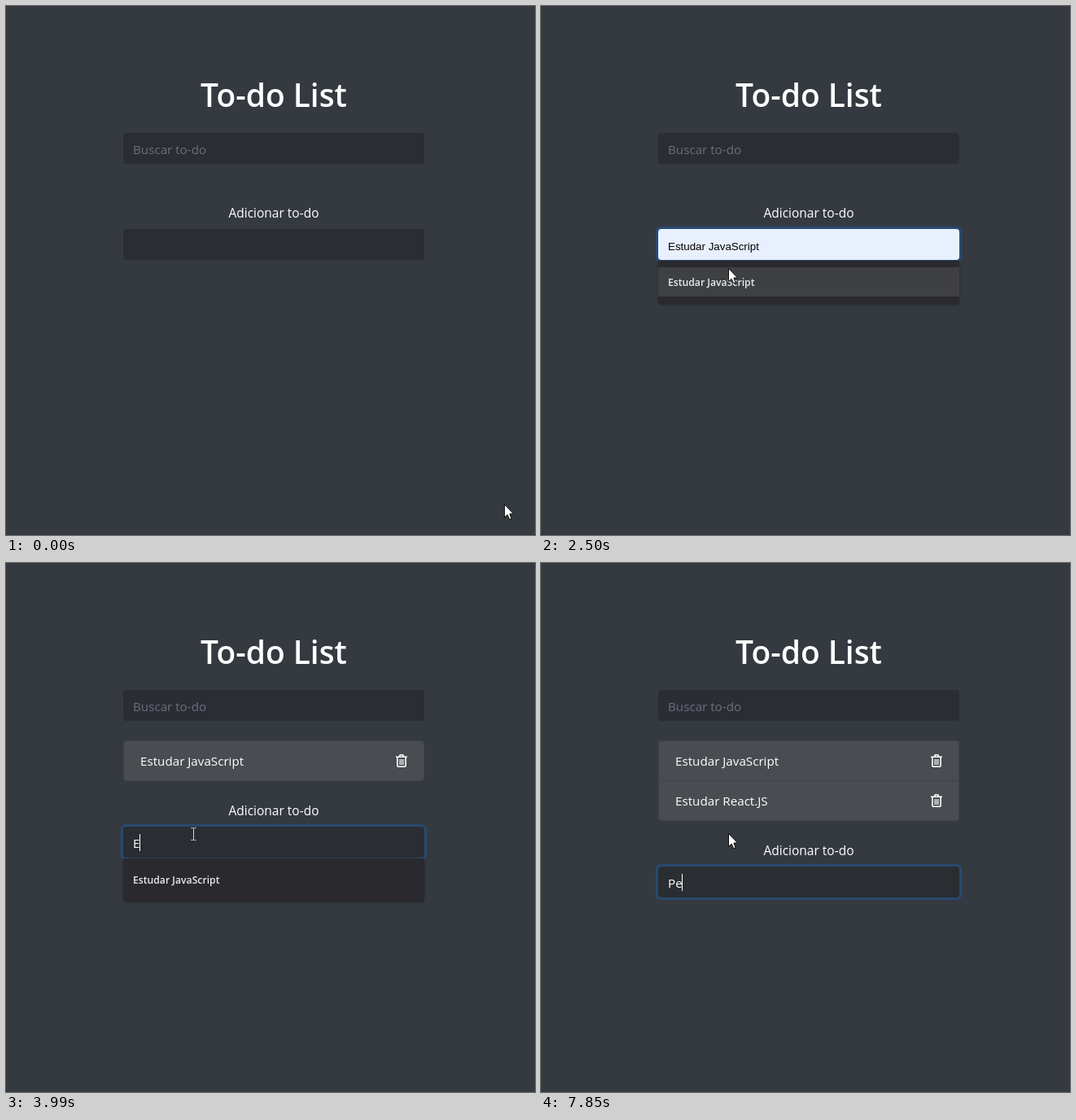
Animation of 650x650 px, one loop 8 s. Source, as an HTML page:

```html
<!DOCTYPE html>
<html lang="pt">
<head>
<meta charset="utf-8">
<title>To-do List</title>
<style>
  html, body { margin: 0; width: 100%; height: 100%; overflow: hidden; background: #353a41; }
  svg { display: block; width: 650px; height: 650px; }
  text { font: 15.2px "Open Sans", "Noto Sans", sans-serif; fill: #fff; white-space: pre; }
  .title { font-size: 38.9px; font-weight: 600; }
  .label { font-size: 15.5px; }
  .middle { text-anchor: middle; }
  .hint { fill: #69717a; }
  .option { font-size: 12.2px; font-weight: 600; fill: #e8eaed; }
  .preview { font: 13.333px "Liberation Sans", Arial, sans-serif; }
  .field { fill: #2b2d35; }
  .row { fill: #494d52; stroke: #40444a; }
</style>
</head>
<body>
<svg viewBox="0 0 650 650">
  <defs>
    <filter id="shadow" x="-5%" y="-20%" width="110%" height="150%">
      <feDropShadow dx="0" dy="1" stdDeviation="1.5" flood-color="#000" flood-opacity=".35"/>
    </filter>
    <g id="trash" fill="none" stroke="#fff" stroke-width="1.6">
      <path d="M479 238.2H493M483.3 237.8L484.3 235.8H487.7L488.7 237.8M480.9 238.5V249.2Q480.9 250.2 482 250.2H490Q491.1 250.2 491.1 249.2V238.5"/>
      <path d="M484 241V248M486 241V248M488 241V248" stroke-width="1.1"/>
    </g>
  </defs>

  <text class="title middle" x="329" y="124">To-do List</text>
  <rect class="field" x="144" y="156" width="370" height="38" rx="4"/>
  <text class="hint" x="156" y="182">Buscar to-do</text>

  <g id="first">
    <rect id="frame" class="row" x="144.5" y="218.5" width="369" height="49" rx="3.5"/>
    <text x="165" y="249">Estudar JavaScript</text>
    <use href="#trash"/>
  </g>
  <g id="second">
    <path d="M145 267.5H513" stroke="#40444a"/>
    <text x="165" y="298">Estudar React.JS</text>
    <use href="#trash" y="49"/>
  </g>

  <g id="form">
    <text class="label middle" x="329" y="260">Adicionar to-do</text>
    <rect id="ring" x="141" y="271" width="376" height="44" rx="6" fill="#274a70"/>
    <rect id="field" class="field" x="144" y="274" width="370" height="38" rx="4"/>
    <text id="value" x="156" y="300"></text>
    <rect id="caret" y="283" width="1" height="21"/>
    <g id="popup">
      <path d="M144 313H514V362Q514 366 510 366H148Q144 366 144 362Z" fill="#292a2d" filter="url(#shadow)"/>
      <rect id="hover" x="144" y="321" width="370" height="36" fill="#3f4042"/>
      <text class="option" x="156" y="344">Estudar JavaScript</text>
    </g>
  </g>

  <g id="pointer">
    <path id="arrow" d="M0 0V16L3.6 12.6L6.2 18H8.2V16.6L6.4 11.5H11Z" fill="#fff" stroke="#000" stroke-width=".9"/>
    <path id="beam" d="M-3 -7.5H-1L0 -7L1 -7.5H3M0 -7V7M-3 7.5H-1L0 7L1 7.5H3" fill="none" stroke="#d5d7d9"/>
  </g>
</svg>
<script>
const LOOP = 8000;
const el = Object.fromEntries([...document.querySelectorAll('svg [id]')].map(n => [n.id, n]));

const initial = { text: '', caret: false, popup: false, hover: false, filled: false,
                  preview: false, rows: 0, beam: false, focusAt: Infinity };

// Each step overrides part of the state from its time on.
const steps = [
  [690, { beam: true }],
  [850, { focusAt: 770, caret: true }],
  [930, { popup: true }],
  [1400, { caret: false }],
  [1950, { caret: true }],
  [2350, { beam: false }],
  [2420, { hover: true, filled: true, preview: true, caret: false, text: 'Estudar JavaScript' }],
  [2890, { popup: false, hover: false, preview: false, caret: true }],
  [2970, { beam: true }],
  [3290, { rows: 1, text: '', filled: false, caret: false }],
  [3360, { caret: true }],
  [3910, { text: 'E' }],
  [3990, { popup: true }],
  ...typing('E', 'studar ', 4310, 133),
  [5420, { text: 'Estudar R' }],
  [5500, { popup: false }],
  ...typing('Estudar R', 'eact', 5720, 160),
  ...typing('Estudar React', '.JS', 6500, 130),
  [6900, { rows: 2, text: '', beam: false }],
  [7300, { caret: false }],
  [7460, { text: 'P', caret: true }],
  [7850, { text: 'Pe' }]
];

// Time and place of the pointer's hot spot.
const path = [
  [70, 612, 612], [230, 560, 540], [450, 390, 375], [690, 272, 284],
  [770, 263, 272], [930, 259, 298], [2190, 259, 298],
  [2500, 230, 322], [2740, 230, 332]
];

function typing(before, added, start, gap) {
  return [...added].map((_, i) =>
    [start + i * gap, { text: before + added.slice(0, i + 1) }]);
}

function pointerAt(t) {
  const next = path.findIndex(p => p[0] > t);
  if (next < 0) return path.at(-1).slice(1);
  if (next === 0) return path[0].slice(1);
  const [a, b] = [path[next - 1], path[next]];
  const k = (t - a[0]) / (b[0] - a[0]);
  return [a[1] + (b[1] - a[1]) * k, a[2] + (b[2] - a[2]) * k];
}

const show = (node, on) => node.setAttribute('visibility', on ? 'inherit' : 'hidden');

function draw(t) {
  const s = Object.assign({}, initial, ...steps.filter(step => step[0] <= t).map(step => step[1]));
  const ink = s.filled ? '#000' : '#fff';
  const sampled = t < 1010 ? 70 + Math.floor((t - 70) / 80) * 80 : t;
  const [x, y] = pointerAt(sampled).map(Math.floor);

  show(el.first, s.rows > 0);
  show(el.second, s.rows > 1);
  el.frame.setAttribute('height', s.rows > 1 ? 98 : 49);
  el.form.setAttribute('transform', `translate(0 ${[0, 50, 99][s.rows]})`);

  const focus = Math.max(0, Math.min(1, (sampled - s.focusAt) / 160));
  el.ring.setAttribute('opacity', focus);
  el.field.style.fill = s.filled ? '#e8f0fe' : focus ? '#2a2d32' : '#2b2d35';

  el.value.textContent = s.text.replace(/ /g, '\u00a0');
  el.value.setAttribute('class', s.preview ? 'preview' : '');
  el.value.style.fill = ink;
  el.caret.setAttribute('x', 156 + Math.round(s.text ? el.value.getComputedTextLength() - .5 : 0));
  el.caret.setAttribute('fill', ink);
  show(el.caret, s.caret);
  show(el.popup, s.popup);
  show(el.hover, s.hover);

  show(el.arrow, !s.beam);
  show(el.beam, s.beam);
  el.pointer.setAttribute('transform', `translate(${x + .5} ${s.beam ? y + 1 : y + .5})`);
}

const start = performance.now();
function tick() {
  draw((performance.now() - start) % LOOP);
  requestAnimationFrame(tick);
}
tick();
</script>
</body>
</html>
```
